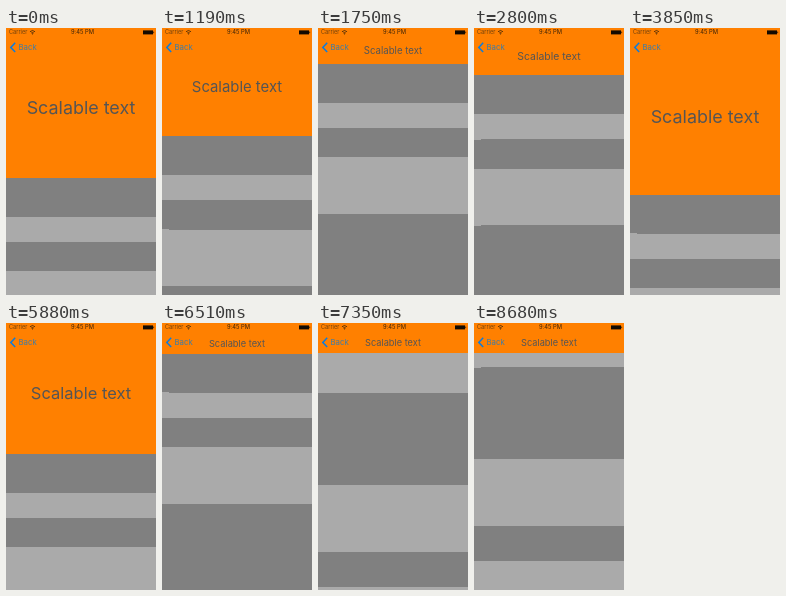
These frames come from a looping animation (150 px wide and 267 px high, 9940 ms). An HTML page with a canvas:

```html
<!DOCTYPE html>
<html lang="en">
<head>
<meta charset="utf-8">
<title>Scalable header</title>
<style>
  html, body { margin: 0; width: 100%; height: 100%; overflow: hidden; background: #808080; }
  canvas { display: block; width: 150px; height: 267px; }
</style>
</head>
<body>
<canvas id="stage"></canvas>
<script>
const WIDTH = 150, HEIGHT = 267, LOOP = 9940, STEP = 70;
const BAR = 30, FULL = 150;
const ORANGE = '#ff8000', DARK = '#808080', LIGHT = '#aaaaaa', BLUE = '#0a7ce0';
const FONT = 'Inter, Roboto, sans-serif';

// Light rows, measured from the top of the table.
const LIGHT_ROWS = [[38.8, 64.2], [93.2, 150.2], [241.7, 308.6], [343.7, 440]];

// Table top over time: [ms, px]
const DRAG = [
  [0, 150], [700, 150], [1190, 108.2], [1750, 36], [1890, 28], [2240, 28],
  [2310, 30], [2590, 30], [2800, 47.3], [3570, 147], [3640, 152.5],
  [3850, 166.6], [4340, 182], [4410, 182], [4550, 184], [4690, 184],
  [4760, 176], [4900, 158.5], [5040, 152], [5110, 152], [5180, 151],
  [5320, 150], [5460, 150]
];
const FLICK = { start: 5460, release: 6510, from: 150, to: 30.6, rest: -107.8, decay: 526, stop: 8680 };

const canvas = document.getElementById('stage');
const ctx = canvas.getContext('2d');
const ratio = window.devicePixelRatio || 1;
canvas.width = Math.round(WIDTH * ratio);
canvas.height = Math.round(HEIGHT * ratio);
ctx.scale(ratio, ratio);

const slope = i => (DRAG[i + 1][1] - DRAG[i][1]) / (DRAG[i + 1][0] - DRAG[i][0]);

function tangent(i) {
  if (i === 0 || i === DRAG.length - 1) return 0;
  const a = slope(i - 1), b = slope(i);
  return a * b <= 0 ? 0 : 2 * a * b / (a + b);
}

// Monotone cubic through the drag points.
function dragTop(t) {
  let i = 0;
  while (i < DRAG.length - 2 && t >= DRAG[i + 1][0]) i++;
  const [t0, y0] = DRAG[i], [t1, y1] = DRAG[i + 1];
  const h = t1 - t0, u = (t - t0) / h, v = 1 - u;
  return y0 * v * v * (1 + 2 * u) + y1 * u * u * (3 - 2 * u)
    + h * u * v * (tangent(i) * v - tangent(i + 1) * u);
}

function tableTop(t) {
  const f = FLICK;
  if (t < f.start) return dragTop(t);
  if (t < f.release) {
    const u = (t - f.start) / (f.release - f.start);
    return f.from + (f.to - f.from) * u * u;
  }
  const elapsed = Math.min(t, f.stop) - f.release;
  return f.rest + (f.to - f.rest) * Math.exp(-elapsed / f.decay);
}

function rect(color, x, y, w, h) {
  ctx.fillStyle = color;
  ctx.fillRect(x, y, w, h);
}

function text(string, x, y, size, color, align = 'left') {
  ctx.font = `${size}px ${FONT}`;
  ctx.textAlign = align;
  ctx.fillStyle = color;
  ctx.fillText(string, x, y);
}

function band(x, w, top, bottom) {
  const y = Math.round(top);
  rect(LIGHT, x, y, w, Math.round(bottom) - y);
}

function drawTable(top) {
  rect(DARK, 0, 0, WIDTH, HEIGHT);
  const inset = 7, line = 0.25; // dark hairline separators start after the inset
  for (const [a, b] of LIGHT_ROWS) {
    band(0, inset, top + a, top + b);
    band(inset, WIDTH - inset, top + a + line, top + b - line);
  }
}

function drawStatusBar() {
  const ink = '#3a2208';
  text('Carrier', 3, 6.4, 5.6, '#70400c');
  text('9:45 PM', 76.5, 6.4, 5.8, ink, 'center');

  ctx.strokeStyle = ink;
  ctx.lineWidth = 0.8;
  for (const r of [1.8, 3.6]) {
    ctx.beginPath();
    ctx.arc(26.5, 6.3, r, -Math.PI * 0.75, -Math.PI * 0.25);
    ctx.stroke();
  }
  rect(ink, 26, 5.4, 1, 1);

  rect('#140a00', 137, 2.4, 10, 4);
  rect('#140a00', 147.4, 3.6, 0.7, 1.6);
}

function drawBackButton() {
  ctx.strokeStyle = BLUE;
  ctx.lineWidth = 1.5;
  ctx.beginPath();
  ctx.moveTo(9.2, 14.8);
  ctx.lineTo(4.8, 19.4);
  ctx.lineTo(9.2, 24);
  ctx.stroke();
  text('Back', 12.5, 22.3, 7.8, '#3c7ca8');
}

function drawHeader(top) {
  const height = Math.max(BAR, top);
  const growth = Math.min(1, (height - BAR) / (FULL - BAR));
  const size = 9.2 + 8.7 * growth;
  rect(ORANGE, 0, 0, WIDTH, Math.round(height));
  text('Scalable text', WIDTH / 2, height / 2 + 5 + size * 0.36, size, '#555555', 'center');
  drawStatusBar();
  drawBackButton();
}

function frame() {
  const t = Math.floor((performance.now() % LOOP) / STEP) * STEP;
  const top = tableTop(t);
  drawTable(top);
  drawHeader(top);
  requestAnimationFrame(frame);
}
frame();
</script>
</body>
</html>
```
